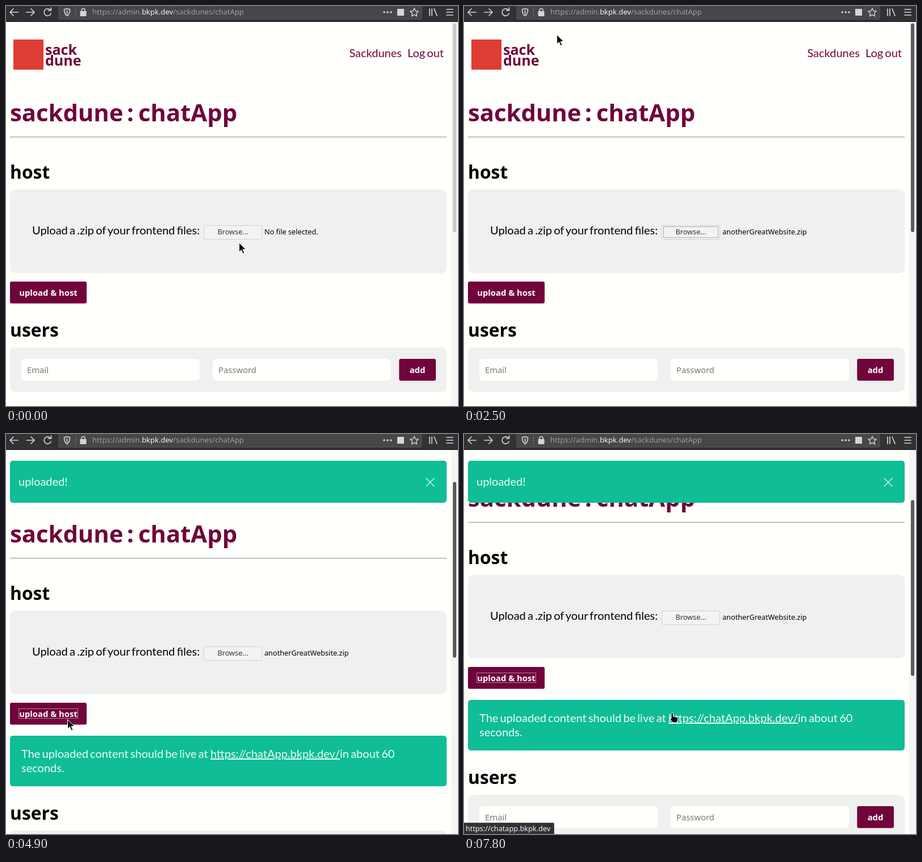
Recreate the animation shown at these times as an HTML page. Size 796 by 704 pixels, loop 8 s.

```html
<!DOCTYPE html>
<html lang="en">
<head>
<meta charset="utf-8">
<title>Upload a site</title>
<style>
html, body { margin: 0; width: 100%; height: 100%; overflow: hidden; background: #fffffb; }
svg { display: block; width: 796px; height: 704px; }
text { font: 12.7px "Noto Sans", "Open Sans", sans-serif; white-space: pre; }
.lato { font: 20px Lato, sans-serif; word-spacing: -1.9px; }
.ui { font-size: 14.8px; fill: #777; }
.bold { font-weight: 600; fill: #fff; }
.h1 { font-size: 41.8px; font-weight: 800; fill: #70043b; }
.h2 { font-size: 31.8px; font-weight: 800; }
.logo { font-size: 25px; font-weight: 700; }
.plum { fill: #70043b; }
.panel { fill: #eff0f0; }
.field { fill: #fffffb; }
.teal { fill: #0fbd96; }
.onTeal { fill: #f0fdf9; }
.url { font-size: 13px; fill: #a0a0a2; }
.head { font-weight: 600; fill: #b5b5ad; }
.zip { font-size: 8px; font-weight: 700; fill: #793e35; text-anchor: middle; }
.icon { fill: none; stroke: #d5d5d7; stroke-width: 1.7; stroke-linecap: round; stroke-linejoin: round; }
.dots { fill: none; stroke-dasharray: 1 1; }
</style>
</head>
<body>
<svg viewBox="0 0 796 704">
  <rect width="796" height="704" fill="#fffffb"/>
  <g id="page">
    <rect x="13" y="59" width="53" height="53" fill="#de3d33"/>
    <text class="logo plum" x="69" y="86">sack</text>
    <text class="logo plum" x="69" y="105">dune</text>
    <text class="lato plum" x="697" y="90" text-anchor="end">Sackdunes</text>
    <text class="lato plum" x="771" y="90" text-anchor="end">Log out</text>

    <g id="main">
      <text class="h1" y="203"><tspan x="7">sackdune</tspan><tspan x="213">:</tspan><tspan x="233">chatApp</tspan></text>
      <path d="M7 230.5H776" stroke="#8c8c8c"/>
      <text class="h2" x="7" y="304">host</text>
      <rect class="panel" x="7" y="323" width="769" height="147" rx="9"/>
      <text class="lato" x="46" y="402">Upload a .zip of your frontend files:</text>
      <rect x="348.5" y="386.5" width="102" height="24" rx="2" fill="#f5f3f1" stroke="#d3d0cc"/>
      <rect id="browseFocus" class="dots" x="351.5" y="388.5" width="96" height="19" stroke="#666"/>
      <text x="399.5" y="402" text-anchor="middle" fill="#333">Browse...</text>
      <text id="fileName" x="455" y="402"></text>
      <rect class="plum" x="7" y="485" width="135" height="38.5" rx="3"/>
      <text class="ui bold" x="74.5" y="510" text-anchor="middle">upload &amp; host</text>
      <rect id="uploadFocus" class="dots" x="22.5" y="495.5" width="104" height="17" stroke="#fff"/>
      <g id="notice">
        <rect class="teal" x="7" y="543" width="769" height="89" rx="5"/>
        <text class="lato onTeal" x="27" y="582">The uploaded content should be live at</text>
        <text class="lato onTeal" x="360" y="582" text-decoration="underline">https://chatApp.bkpk.dev/</text>
        <text class="lato onTeal" x="588" y="582">in about 60</text>
        <text class="lato onTeal" x="27" y="607">seconds.</text>
      </g>
      <g id="users">
        <text class="h2" x="7" y="582">users</text>
        <rect class="panel" x="7" y="601" width="769" height="78" rx="9"/>
        <rect class="field" x="27" y="621" width="314" height="38.5" rx="6"/>
        <rect class="field" x="364" y="621" width="314" height="38.5" rx="6"/>
        <text class="ui" x="37" y="646">Email</text>
        <text class="ui" x="374" y="646">Password</text>
        <rect class="plum" x="692.3" y="621" width="64.7" height="38.5" rx="3"/>
        <text class="ui bold" x="724.5" y="646" text-anchor="middle">add</text>
      </g>
    </g>
  </g>

  <g id="banner">
    <rect class="teal" x="7" width="769" height="74" rx="5"/>
    <text class="lato onTeal" x="22" y="44">uploaded!</text>
    <path d="M739.5 30.5l15 15m0-15l-15 15" stroke="#e6faf4" stroke-width="1.3"/>
  </g>

  <rect x="784" y="27" width="12" height="677" fill="#f4f4f2"/>
  <rect id="thumb" x="787" width="6" rx="3"/>

  <g id="toolbar">
    <rect width="796" height="27" fill="#323234"/>
    <path d="M0 27.5H796" stroke="#0c0c0d"/>
    <rect x="93" y="-5" width="639" height="28" rx="2" fill="#474749" stroke="#58585a"/>
    <path d="M122.5 2V20" stroke="#68686a"/>
    <g class="icon">
      <path d="M21 11H7m6-6L7 11l6 6M36 11H50m-6-6l6 6-6 6"/>
      <path d="M78 7a6.2 6.2 0 1 0 1.2 6M79.5 3v5h-5"/>
      <path d="M107.5 4.5l5 1.5c0 6-1 9-5 11.5-4-2.5-5-5.5-5-11.5zM107.5 8v6"/>
      <path d="M133 10V7.5a3 3 0 0 1 6 0V10"/>
      <path d="M719 4l2.2 4.7 5 .6-3.7 3.5 1 5-4.5-2.5-4.5 2.5 1-5-3.7-3.5 5-.6z" stroke-width="1.4"/>
      <path d="M746 5V17M750 5V17M754 5l5 12M776 6h11m-11 5h11m-11 5h11"/>
    </g>
    <g fill="#d5d5d7">
      <rect x="130.5" y="9" width="11" height="9" rx="1"/>
      <circle cx="666" cy="11" r="1.8"/><circle cx="672" cy="11" r="1.8"/><circle cx="678" cy="11" r="1.8"/>
      <rect x="689" y="5" width="12" height="12"/>
    </g>
    <text class="url" x="152" y="15">https://admin.<tspan fill="#f5f5f7">bkpk.dev</tspan>/sackdunes/chatApp</text>
  </g>

  <g id="dialog">
    <rect width="796" height="704" fill="#282825"/>
    <rect width="16" height="704" fill="#35322f"/>
    <rect y="39" width="16" height="34" fill="#6ba398"/>
    <path d="M16.5 0V704" stroke="#1b1b19"/>
    <rect y="700" width="796" height="4" fill="#2f1a1e"/>
    <text class="head" x="23" y="22">Name</text>
    <text class="head" x="767" y="22">Size</text>
    <g id="selection">
      <rect x="17" y="30" width="779" height="23" fill="#9dfbe7"/>
      <path class="dots" d="M796 31.5H18.5V51.5H796" stroke="#4d8c80"/>
    </g>
    <g class="row">
      <rect x="25.5" y="34.5" width="15" height="13" rx="1" fill="#e5d5c4" stroke="#a66a58"/>
      <text class="zip" x="33" y="44">ZIP</text>
      <text x="48" y="46">mySweetWebsite.zip</text>
      <text x="769" y="46">387 bytes</text>
    </g>
    <g class="row" transform="translate(0 22)">
      <rect x="25.5" y="34.5" width="15" height="13" rx="1" fill="#e5d5c4" stroke="#a66a58"/>
      <text class="zip" x="33" y="44">ZIP</text>
      <text x="48" y="46">anotherGreatWebsite.zip</text>
      <text x="769" y="46">387 bytes</text>
    </g>
  </g>

  <g id="status">
    <rect x="-2" y="684.5" width="160.5" height="22" rx="2" fill="#323234" stroke="#555557"/>
    <text x="3" y="699" fill="#f5f5f7">https://chatapp.bkpk.dev</text>
  </g>

  <g id="cursor" stroke-linejoin="round">
    <path id="arrow" d="M.5.5V17L4.300 13.500 7.300 20 10 18.800 7.100 12.500H12.500Z" fill="#111" stroke="#fff"/>
    <g id="beam" fill="none">
      <path d="M-3-8H3M0-8V8M-3 8H3" stroke="#fff" stroke-width="3.5"/>
      <path d="M-3-8H3M0-8V8M-3 8H3" stroke="#111" stroke-width="1.3"/>
    </g>
    <path id="hand" d="M-2 1q2-2.500 3.500 0V6l7 1.500q1.500.5 1.300 2.500L8.500 17H1L-4 11q-.5-2 2-1.500Z" fill="#111" stroke="#fff"/>
  </g>
</svg>
<script>
const LOOP = 8000, STEP = 100;
const $ = id => document.getElementById(id);

// Each entry: time, then the values reached at that time
const pointer = [
  [0, 410, 416], [100, 401, 406], [200, 401, 406], [300, 399, 400], [1100, 399, 400],
  [1500, 164, 77], [1600, 164, 77], [1800, 163, 50], [2500, 163, 50],
  [3300, 108, 502], [6300, 108, 502], [6400, 116, 500], [6500, 116, 500],
  [7300, 325, 491], [7400, 325, 491], [7600, 367, 491]
];
const scrolling = [[4500, 0], [4600, 16], [4900, 106], [5100, 142], [5400, 169]];

function at(keys, t) {
  const i = keys.findIndex(k => k[0] > t);
  if (i === 0) return keys[0].slice(1);
  if (i < 0) return keys.at(-1).slice(1);
  const a = keys[i - 1], b = keys[i], p = (t - a[0]) / (b[0] - a[0]);
  return a.slice(1).map((v, j) => v + (b[j + 1] - v) * p);
}
const show = (id, on) => $(id).style.display = on ? "" : "none";
const move = (id, x, y) => $(id).setAttribute("transform", `translate(${x} ${y})`);

function draw(now) {
  const t = Math.floor(now % LOOP / STEP) * STEP;
  const chosen = t >= 2500, uploaded = t >= 3600;

  const scroll = Math.round(at(scrolling, t)[0]);
  move("page", 0, -scroll);
  move("main", 0, uploaded ? 94 : 0);
  move("users", 0, uploaded ? 109 : 0);
  move("banner", 0, Math.max(47, 152 - scroll));
  show("banner", uploaded);
  show("notice", uploaded);
  show("browseFocus", chosen && t < 3400);
  show("uploadFocus", t >= 3400);
  $("fileName").textContent = chosen ? "anotherGreatWebsite.zip" : "No file selected.";

  const thumb = $("thumb");
  thumb.setAttribute("y", 30.5 + scroll * .507);
  thumb.setAttribute("height", uploaded ? 309.5 : 367.5);
  thumb.setAttribute("fill", chosen ? "#5a5a5a" : "#cbcbc9");

  show("dialog", t >= 300 && !chosen);
  const p = Math.min(1, Math.max(0, (t - 200) / 900));
  $("dialog").style.opacity = 1 - (1 - p) ** 3;
  const picked = t >= 1700 ? 1 : 0;
  move("selection", 0, picked * 22);
  document.querySelectorAll(".row").forEach((row, i) =>
    row.setAttribute("fill", i === picked ? "#111" : "#c9c9c1"));

  show("status", t >= 7800);
  const [x, y] = at(pointer, t).map(Math.round);
  move("cursor", x, y);
  show("arrow", t < 6400);
  show("beam", t >= 6400 && t < 7600);
  show("hand", t >= 7600);
}

const start = performance.now();
function tick() {
  draw(performance.now() - start);
  requestAnimationFrame(tick);
}
tick();
</script>
</body>
</html>
```
